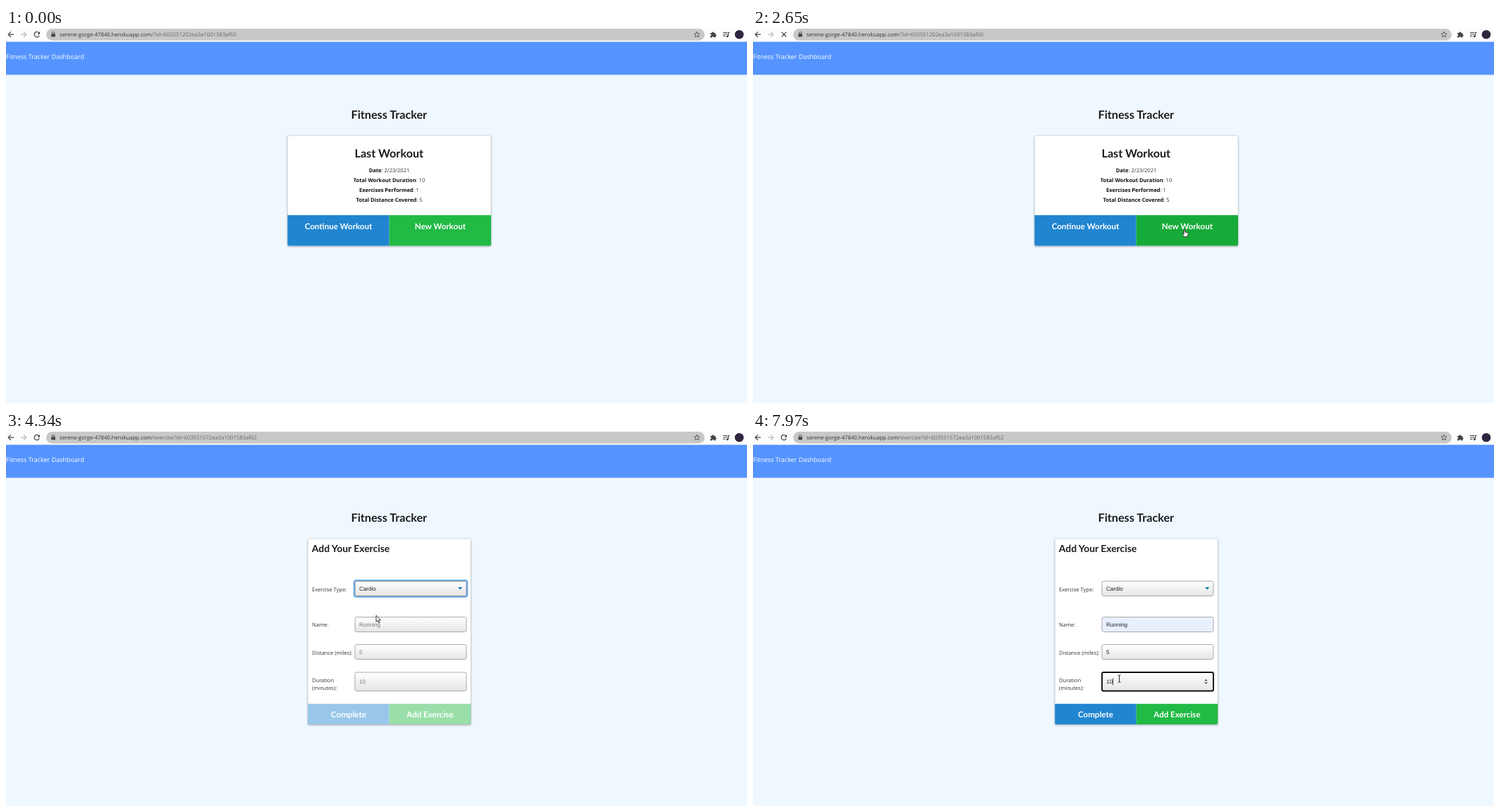
These frames come from a looping animation (1051 px wide and 533 px high, 8 s). An HTML page:

```html
<!DOCTYPE html>
<html lang="en">
<head>
<meta charset="utf-8">
<title>Fitness Tracker</title>
<style>
html, body { margin: 0; width: 100%; height: 100%; overflow: hidden; background: #f0f8ff; }
svg { display: block; width: 1051px; height: 533px; }
text { font-family: "Open Sans", "Noto Sans", sans-serif; font-size: 7.55px; fill: #333; text-rendering: geometricPrecision; }
.mid { text-anchor: middle; }
.head { font-family: Lato, sans-serif; font-weight: 700; font-size: 16.18px; fill: #1b1c1d; }
.btn { font-family: Lato, sans-serif; font-weight: 700; font-size: 11.56px; fill: #fff; text-anchor: middle; }
.form { font-family: "Liberation Sans", Arial, sans-serif; font-size: 8.09px; fill: #222; }
.hint { fill: #777; }
.url { font-size: 7.7px; fill: #333; }
.bold { font-weight: 700; fill: #111; }
.card { fill: #fff; stroke: #d0d4d9; stroke-width: .7; filter: drop-shadow(0 1px 1.2px rgba(0,0,0,.3)); }
.popup { fill: #fff; filter: drop-shadow(0 1px 1.3px rgba(0,0,0,.35)); }
.icon { fill: none; stroke: #444; stroke-width: 1.2; }
</style>
</head>
<body>
<svg viewBox="0 0 1051 533">
  <defs>
    <linearGradient id="shade" x1="0" y1="0" x2="0" y2="1">
      <stop offset="0" stop-color="#fff"/><stop offset="1" stop-color="#e5e5e5"/>
    </linearGradient>
  </defs>
  <rect width="1051" height="533" fill="#f0f8ff"/>
  <rect width="1051" height="20" fill="#fdfdfd"/>
  <rect y="19.6" width="1051" height="46.9" fill="#5594ff"/>
  <rect x="57" y="1" width="934" height="16.8" rx="8.4" fill="#c8c8c8"/>
  <g class="icon">
    <path d="M11 9.2H3.2M7 5.4L3.2 9.2L7 13"/>
    <path d="M21 9.2H28.8M25 5.4L28.8 9.2L25 13" stroke="#bbb"/>
    <path d="M65.4 8.5V7.3a1.7 1.7 0 0 1 3.4 0V8.5" stroke-width=".9"/>
    <path d="M980 5.2l1.1 2.7 2.9.2-2.2 1.9.7 2.9-2.5-1.6-2.5 1.6.7-2.9-2.2-1.9 2.9-.2z" stroke-width=".8"/>
    <path d="M1017 6.5h6M1017 9h6M1017 11.5h3.5M1024.4 12V6.5h2.2"/>
  </g>
  <g fill="#444">
    <rect x="64.3" y="8.2" width="5.6" height="4.3" rx=".6"/>
    <path d="M999 7h2.4a1.4 1.4 0 1 1 2.8 0h2.1v2.2a1.4 1.4 0 1 1 0 2.8v1.6h-2.2a1.3 1.3 0 0 0-2.6 0H999v-2.4a1.3 1.3 0 0 0 0-2.6z"/>
    <circle cx="1023.2" cy="12" r="1.4"/>
  </g>
  <circle cx="1040" cy="9.2" r="6.3" fill="#30243f"/>
  <text x="0" y="44.3" style="font-size:9.03px;fill:#fff">Fitness Tracker Dashboard</text>
  <text x="543.3" y="129" class="head mid">Fitness Tracker</text>
  <g id="live"></g>
</svg>
<script>
const LOOP = 8000;
const live = document.getElementById('live');

// Bursts of activity: start, end, number of picture changes
const BURSTS = [
  [70, 860, 11], [940, 1720, 11], [1870, 2650, 11], [2730, 3480, 11],
  [3560, 3870, 5], [4100, 4880, 11], [4950, 5030, 2], [5260, 5340, 2],
  [5490, 5890, 6], [6360, 6360, 1], [6820, 7280, 7], [7740, 7970, 4]
];

// Pointer track: time, x, y
const TRACK = [
  [70, 876, 486], [300, 760, 400], [540, 640, 300], [623, 560, 261],
  [702, 470, 318], [781, 428, 330], [860, 442, 336],
  [940, 450, 340], [1100, 520, 379], [1340, 600, 360], [1480, 630, 300], [1720, 612, 284],
  [1870, 560, 230], [1948, 500, 195], [2026, 468, 173], [2120, 472, 181],
  [2400, 590, 270], [2500, 612, 286], [2730, 612, 286],
  [2880, 612, 310], [3030, 600, 411], [3180, 590, 325], [3330, 578, 232], [3480, 560, 227],
  [3870, 525, 252], [4100, 524, 258], [4256, 524, 259], [4880, 529, 279],
  [5030, 529, 279], [5260, 529, 281], [5340, 526, 301], [5490, 526, 302],
  [5810, 524, 314], [6820, 524, 314], [6900, 524, 314], [7200, 519.5, 352], [8000, 519.5, 352]
];

// Time of the latest picture change
function lastChange(t) {
  let at = 0;
  for (const [start, end, steps] of BURSTS) {
    if (t < start) break;
    const gap = steps > 1 ? (end - start) / (steps - 1) : 1;
    at = Math.min(end, start + Math.floor((t - start + 8) / gap) * gap);
  }
  return at;
}

function pointerAt(t) {
  const i = TRACK.findIndex(k => k[0] >= t);
  if (i <= 0) return TRACK[0].slice(1);
  const [t0, x0, y0] = TRACK[i - 1], [t1, x1, y1] = TRACK[i];
  const f = (t - t0) / (t1 - t0);
  return [x0 + (x1 - x0) * f, y0 + (y1 - y0) * f];
}

const text = (x, y, s, cls = '', extra = '') => `<text x="${x}" y="${y}" class="${cls}" ${extra}>${s}</text>`;
const rect = (x, y, w, h, fill, extra = '') => `<rect x="${x}" y="${y}" width="${w}" height="${h}" fill="${fill}" ${extra}/>`;
const path = (d, fill, extra = '') => `<path d="${d}" fill="${fill}" ${extra}/>`;
const inside = ([x, y], x0, y0, x1, y1) => x >= x0 && x < x1 && y >= y0 && y < y1;

function toolbar(t) {
  const query = t < 2725 ? '/?id=603551202ea3a1001583af60'
    : t < 2875 ? '/exercise' : '/exercise?id=603551572ea3a1001583af62';
  const loading = t > 2570 && t < 2875;
  return text(76, 12.3, `serene-gorge-47840.herokuapp.com<tspan fill="#666">${query}</tspan>`, 'url') +
    (loading ? path('M40.6 5.9L47.2 12.5M47.2 5.9L40.6 12.5', 'none', 'class="icon"')
      : path('M47 7.3A3.7 3.7 0 1 0 47.3 10.4', 'none', 'class="icon"') + path('M48 5V8.7H44.3Z', '#444'));
}

function buttonPair(x, y, w, h, colors, labels, base, opacity = 1) {
  const half = w / 2, r = 2;
  return `<g opacity="${opacity}">` +
    path(`M${x} ${y}h${half}v${h}h${r - half}a${r} ${r} 0 0 1 ${-r} ${-r}z`, colors[0]) +
    path(`M${x + half} ${y}h${half}v${h - r}a${r} ${r} 0 0 1 ${-r} ${r}h${r - half}z`, colors[1]) +
    text(x + half / 2, base, labels[0], 'btn') + text(x + half * 1.5, base, labels[1], 'btn') + '</g>';
}

function summary(p, shown) {
  const over = (x0, x1) => shown && inside(p, x0, 266, x1, 309);
  const facts = [['Date', '2/23/2021'], ['Total Workout Duration', 10], ['Exercises Performed', 1], ['Total Distance Covered', 5]];
  return rect(399.3, 153, 288.7, 156.5, '#fff', 'rx="2" class="card"') +
    text(543.3, 184, 'Last Workout', 'head mid') +
    facts.map(([k, v], i) => text(543.5, 204.9 + i * 13.9, `<tspan class="bold">${k}</tspan>: ${v}`, 'mid')).join('') +
    buttonPair(399.3, 266, 288.7, 43.5,
      [over(399, 543) ? '#1678c2' : '#2185d0', over(543, 688) ? '#16ab39' : '#21ba45'],
      ['Continue Workout', 'New Workout'], 285.8);
}

function field(y, h, value, o = {}) {
  const mid = y + h / 2;
  let s = '';
  if (o.glow) s += rect(493.8, y - .7, 160.4, h + 1.4, 'none', 'rx="3" stroke="#69aef5" stroke-width="2.2"');
  s += rect(495, y + .5, 158, h - 1, o.filled ? '#e8f0fe' : 'url(#shade)',
    `rx="2.3" stroke="${o.focus ? '#111' : o.hover || o.glow ? '#888' : '#aaa'}" stroke-width="${o.focus ? 1.9 : 1}"`);
  s += text(501, mid + 2.9, value, 'form' + (o.hint ? ' hint' : ''));
  if (o.caret !== undefined) s += rect(o.caret, mid - 5, .8, 10, '#111');
  if (o.spin) s += path(`M640.3 ${mid - .9}l2.2-2.6 2.2 2.6zm0 1.9l2.2 2.6 2.2-2.6z`, '#444');
  if (o.arrow) s += path(`M641.2 ${mid - 2}h6.2l-3.1 3.6z`, '#0a7bb5');
  return s;
}

function optionList(p) {
  const rows = ['Select Exercise Type', 'Resistance', 'Cardio'];
  const active = p[1] >= 257 ? 2 : p[1] >= 246 ? 1 : 0;
  return rect(494.9, 235.4, 157.4, 31.4, '#fff', 'stroke="#666" stroke-width=".9"') +
    rows.map((label, i) => {
      const lit = i && i === active, y = 235.8 + i * 10.4;
      return (lit ? rect(495.3, y, 156.6, 10.4, '#1e90ff') : '') +
        text(501, y + 7.6, label, 'form', `style="fill:${lit ? '#fff' : i ? '#222' : '#777'}"`);
    }).join('');
}

function cardioFields(t, p) {
  const preview = t > 5335, chosen = t > 5485;
  const onDistance = t > 5885 && t < 7275, onDuration = t > 7275;
  const typed5 = t > 6890, typed = t > 7885 ? '10' : t > 7810 ? '1' : '';
  const hover = (y0, y1) => inside(p, 494, y0, 654, y1);
  const blinkOff = t > 6355 && t < 6815;
  let s = text(434, 278.2, 'Name:') + text(434, 317.5, 'Distance (miles):') +
    text(434, 356.9, 'Duration') + text(434, 367.9, '(minutes):');
  s += field(264, 22, 'Running', {
    hint: !preview, filled: preview, focus: t > 4945 && t < 5885, hover: hover(264, 286),
    caret: t > 4945 && !preview ? 501 : t > 5485 && t < 5885 ? 531.3 : undefined
  });
  s += field(303, 22, '5', {
    hint: !typed5, focus: onDistance, hover: hover(303, 325),
    spin: onDistance || chosen && hover(303, 325),
    caret: onDistance && !blinkOff ? (typed5 ? 505.8 : 501) : undefined
  });
  s += field(342.5, 27.5, typed || '10', {
    hint: !typed, focus: onDuration, hover: hover(343, 370), spin: onDuration || hover(343, 370),
    caret: onDuration && (t < 7735 || typed) ? 501 + typed.length * 4.6 : undefined
  });
  if (t > 5025 && !chosen) {
    s += rect(494.5, 287, 159, 29.6, '#fff', 'rx="1.5" class="popup"') +
      (preview ? rect(494.5, 291, 159, 21.5, '#eee') : '') +
      text(501.5, 304.5, 'Running', '', 'style="fill:#222"');
  }
  return s;
}

function exercise(t, p) {
  const picked = t > 4250, open = t > 3475 && !picked;
  const bottom = picked ? 417 : 281.8, top = picked ? 387.7 : 252.4;
  const fade = Math.min(1, Math.max(0, (t - 7800) / 140));
  return rect(428.2, 153, 231, bottom - 153, '#fff', 'rx="2" class="card"') +
    text(433.8, 172.4, 'Add Your Exercise', 'head', 'style="font-size:13.87px"') +
    text(434, 227.7, 'Exercise Type:') +
    buttonPair(428.2, top, 231, bottom - top, ['#2185d0', '#21ba45'], ['Complete', 'Add Exercise'], top + 19.3, .45 + .55 * fade) +
    field(213, 22, picked ? 'Cardio' : 'Select Exercise Type',
      { arrow: true, glow: t > 3475 && t < 4945, hover: inside(p, 494, 213, 654, 235) }) +
    (picked ? cardioFields(t, p) : '') + (open ? optionList(p) : '');
}

function pointer(t, p) {
  const [x, y] = p;
  const at = `transform="translate(${x} ${y})"`;
  const popup = t > 5025 && t < 5485 && y > 287;
  const beam = t > 4250 && !popup && [[264, 286], [303, 325], [343, 370]].some(([a, b]) => inside(p, 494, a, 654, b));
  if (beam) return path('M-2 -5H-.6L0 -4.5L.6 -5H2M0 -4.5V4.5M-2 5H-.6L0 4.5L.6 5H2', 'none', `${at} stroke="#111" stroke-width=".9"`);
  const ink = `${at} stroke="#111" stroke-width=".8" stroke-linejoin="round"`;
  if (t < 2725 && inside(p, 399, 266, 688, 309)) {
    return path('M-.9 .8Q0 -.5 .9 .8V4L4.4 4.9Q5.4 5.2 5.2 6.5L4.5 10.8H-.4L-3 7Q-3 5.6 -.9 7Z', '#fff', ink);
  }
  return path('M.4 .6V9.8L2.5 7.8L4 11.2L5.4 10.6L4 7.3H6.8Z', '#fff', ink);
}

let drawn = -1;
function draw(time) {
  const t = lastChange(time);
  if (t === drawn) return;
  drawn = t;
  const shown = t >= 70, p = pointerAt(t);
  live.innerHTML = toolbar(t) + (t < 2725 ? summary(p, shown) : exercise(t, p)) + (shown ? pointer(t, p) : '');
}

const begin = performance.now();
function tick() {
  draw((performance.now() - begin) % LOOP);
  requestAnimationFrame(tick);
}
tick();
</script>
</body>
</html>
```
